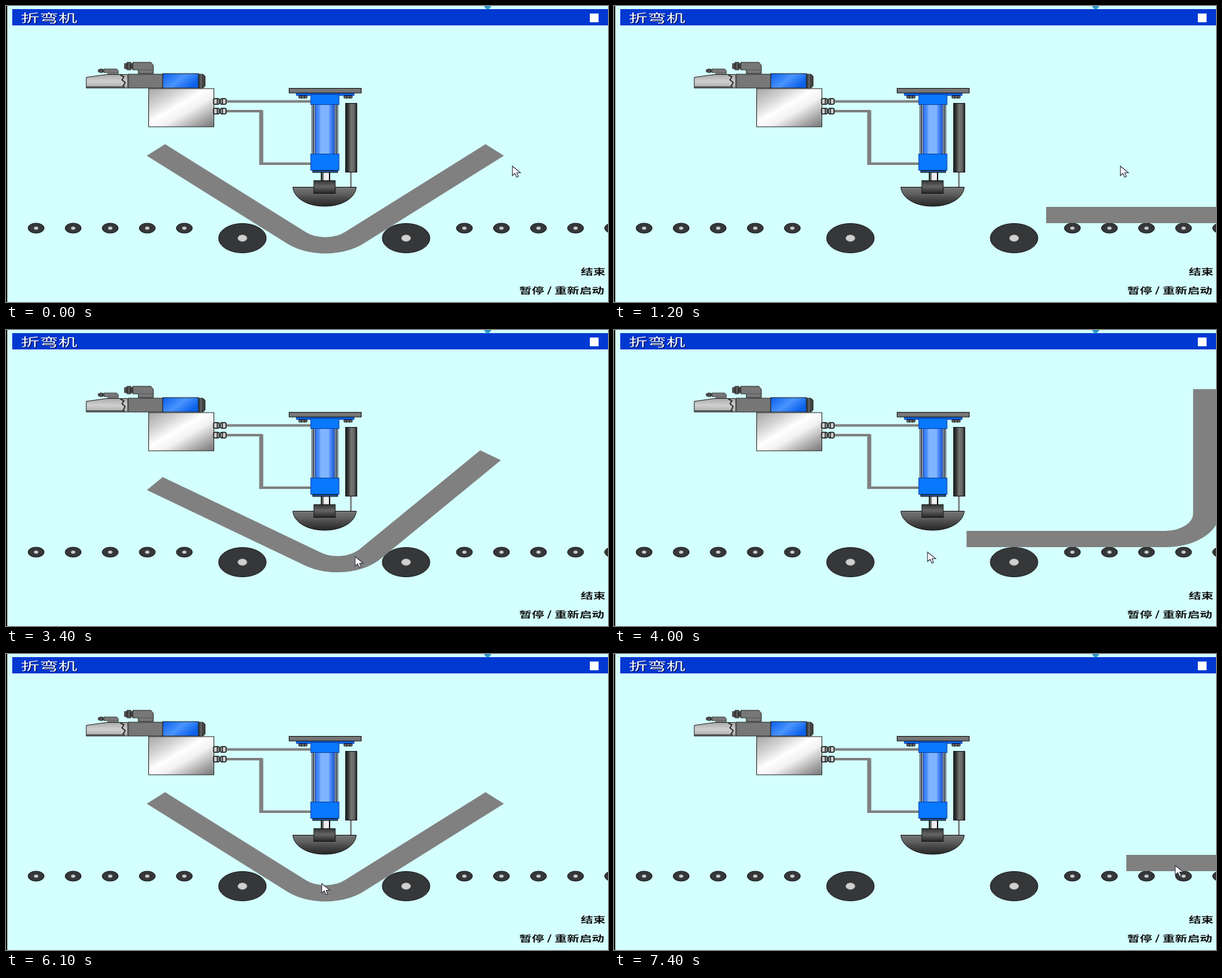
An HTML page that plays this animation: 960 px wide and 473 px high, repeating every 7.5 s.

```html
<!DOCTYPE html>
<html lang="zh">
<head>
<meta charset="utf-8">
<title>折弯机</title>
<style>
  html, body { margin: 0; width: 100%; height: 100%; overflow: hidden; background: #d4ffff; }
  svg { display: block; width: 960px; height: 473px; }
  text { font-family: "Noto Sans CJK SC", "Noto Sans CJK", sans-serif; font-weight: 700; }
  .title { font-size: 30px; font-weight: 500; }
</style>
</head>
<body>
<svg viewBox="0 0 960 473">
  <defs>
    <linearGradient id="steel" x1="0" y1="0" x2="1" y2="1">
      <stop offset="0" stop-color="#a5a5a5"/><stop offset=".25" stop-color="#d2d2d2"/>
      <stop offset=".45" stop-color="#fff"/><stop offset=".6" stop-color="#f2f2f2"/>
      <stop offset=".85" stop-color="#a0a0a0"/><stop offset="1" stop-color="#777"/>
    </linearGradient>
    <linearGradient id="sensor">
      <stop offset="0" stop-color="#222"/><stop offset=".22" stop-color="#333"/>
      <stop offset=".5" stop-color="#777"/><stop offset=".75" stop-color="#666"/><stop offset="1" stop-color="#222"/>
    </linearGradient>
    <linearGradient id="barrel">
      <stop offset="0" stop-color="#2f6fe8"/><stop offset=".2" stop-color="#4c92ff"/>
      <stop offset=".3" stop-color="#80b4ff"/><stop offset=".68" stop-color="#80b4ff"/>
      <stop offset=".8" stop-color="#4588fa"/><stop offset="1" stop-color="#2459c8"/>
    </linearGradient>
    <linearGradient id="coil" x2="1" y2=".5">
      <stop offset="0" stop-color="#0a60e8"/><stop offset=".55" stop-color="#4a94ff"/><stop offset="1" stop-color="#0c62ea"/>
    </linearGradient>
    <linearGradient id="dish" x2="0" y2="1">
      <stop offset="0" stop-color="#777"/><stop offset=".4" stop-color="#5c5c5c"/>
      <stop offset=".55" stop-color="#4b4b4b"/><stop offset="1" stop-color="#262626"/>
    </linearGradient>
    <linearGradient id="clamp" x2="0" y2="1">
      <stop offset="0" stop-color="#333"/><stop offset=".45" stop-color="#666"/><stop offset="1" stop-color="#252525"/>
    </linearGradient>
    <linearGradient id="nose" x2="0" y2="1">
      <stop offset="0" stop-color="#aaa"/><stop offset=".5" stop-color="#d0d0d0"/><stop offset="1" stop-color="#aaa"/>
    </linearGradient>
    <g id="nut" stroke="#111" stroke-width="1.500" fill="#ccc">
      <rect x="0" y="-4.500" width="9" height="9" rx="2"/>
      <rect x="11" y="-4.500" width="9" height="9" rx="2"/>
      <path d="M6-4V4M14-4V4"/>
    </g>
    <g id="plug" stroke="#222" fill="#777">
      <path d="M13 1H42L46 6V19H22V13H13Z"/>
      <path d="M0 3H4V11H0ZM4 1H10V13H4ZM10 3H13V11H10Z" fill="#555"/>
      <path d="M23 13H46" stroke="#555"/>
    </g>
  </defs>

  <rect width="960" height="473" fill="#d4ffff"/>
  <rect x="10" y="5" width="950" height="26" fill="#0038d2"/>
  <path d="M762 0H774L771 4L768 6L765 4Z" fill="#2a98c8"/>
  <rect x="931" y="12" width="14" height="14" fill="#fff"/>
  <g transform="scale(1 .62)">
    <text class="title" x="25" y="43.500" fill="#001560">折弯机</text>
    <text class="title" x="23.500" y="42" fill="#fff">折弯机</text>
  </g>
  <g transform="scale(1 .66)" font-size="19.800" text-anchor="end" fill="#111">
    <text x="956" y="650">结束</text>
    <text x="954" y="695">暂停 / 重新启动</text>
  </g>

  <g id="rollers"></g>
  <path id="plate" fill="none" stroke="#808080" stroke-width="41.500"/>

  <g fill="none" stroke="#808080">
    <path d="M350 152.500H487" stroke-width="4"/>
    <path d="M350 168H409M405 252H487" stroke-width="4"/>
    <path d="M407 167V254" stroke-width="6.500"/>
  </g>

  <g stroke="#222">
    <use href="#plug" transform="translate(189 89)"/>
    <use href="#plug" transform="translate(147 100) scale(.7 .5)"/>
    <path d="M128 114L160 109.500H194V131H128Z" fill="url(#nose)"/>
    <path d="M128 129.500H190" stroke="#444" stroke-width="2"/>
    <path d="M182 110L188 113L185 118L190 122L186 130" fill="none" stroke="#333" stroke-width="2"/>
    <rect x="195" y="109" width="55" height="22" fill="#777"/>
    <rect x="250" y="108" width="57" height="23" fill="url(#coil)"/>
    <path d="M307 109H314L317.500 112V128L314 131H307Z" fill="#444"/>
    <path d="M311 109V131" stroke="#888"/>
    <rect x="227.500" y="132" width="104" height="61" fill="url(#steel)"/>
  </g>
  <use href="#nut" x="331" y="152.500"/>
  <use href="#nut" x="331" y="168"/>

  <g id="ram" stroke="#111">
    <path d="M550 205V290" stroke="#777" stroke-width="2.500"/>
    <rect x="503" y="205" width="13" height="80" fill="#eee" stroke-width="2"/>
    <path d="M505 205V280" stroke="#666" stroke-width="3"/>
    <path d="M457.500 289.500H558.500C557 307 536 320 508 320S459 307 457.500 289.500Z" fill="url(#dish)"/>
    <rect x="491" y="279" width="34" height="20.500" fill="url(#clamp)"/>
  </g>

  <g stroke="#111">
    <rect x="541.500" y="155.500" width="18" height="110" fill="url(#sensor)"/>
    <rect x="488" y="157" width="41" height="80" fill="#c8dcf0"/>
    <path d="M490.500 157V237M526.500 157V237" stroke-width="1.500"/>
    <rect x="493" y="157" width="31" height="80" fill="url(#barrel)" stroke="#123a90"/>
    <path d="M463 139H555V143H463Z" fill="#0a62ea" stroke="#0b3f9c"/>
    <rect x="486" y="141.500" width="45" height="16" fill="#0878ff" stroke="#0b3f9c"/>
    <rect x="486" y="236.500" width="45" height="26" fill="#0878ff" stroke="#0b3f9c"/>
    <path d="M489 263H529V266H489Z" fill="#235ba8"/>
    <rect x="451.500" y="131.500" width="115" height="7.500" fill="#777"/>
    <path d="M467 143.500H480V147H467ZM539 143.500H552V147H539Z" fill="#777"/>
    <path d="M471 143V148M476 143V148M543 143V148M548 143V148"/>
  </g>

  <g id="tools" fill="#c4f1f4" stroke="#92ced8" stroke-width="1.200">
    <path d="M18 458L27 452V456H39V460H27V464Z"/>
    <path d="M63 464L66 460L78 451L81 453L69 462Z"/>
    <path d="M104 453H125V463H104ZM104 455H125"/>
    <path d="M168 458L159 452V456H146V460H159V464Z"/>
  </g>
  <rect width="2" height="473" fill="#000"/>
  <path id="cursor" d="M0 0V15L4 11.500L7 17.500L9.500 16.500L7 10.500H13Z" fill="#fff" stroke="#334" stroke-width="1.100"/>
</svg>
<script>
const $ = id => document.getElementById(id);
const LOOP = 7500, CYCLE = 2933, LEAD = 1283, HOLD = 7200;
const SPEED = 0.954, SQUEEZE = 0.627, RADIUS = 65, HALF_THICK = 20.75, FLOOR = 347;

const roller = (x, y, rx, ry, dot) =>
  `<ellipse cx="${x}" cy="${y}" rx="${rx}" ry="${ry}" fill="#353739" stroke="#17191a"/>` +
  `<ellipse cx="${x}" cy="${y}" rx="${dot}" ry="${dot * .72}" fill="#d0d0d0" stroke="#777" stroke-width=".6"/>`;
let html = roller(377, 371, 38, 23.5, 7.5) + roller(638, 371, 38, 23.5, 7.5);
for (let i = 0; i < 5; i++)
  for (const start of [48, 731]) html += roller(start + 59.1 * i, 355, 12.8, 8, 3.5);
$('rollers').innerHTML = html;

// time, x, y
const cursorPath = [
  [0, 807.5, 256], [1300, 807.5, 256], [1600, 720, 310], [2300, 571, 364], [3300, 571, 364],
  [3800, 500, 355], [4900, 500, 355], [5250, 854, 361], [5500, 854, 361], [5900, 503.5, 367],
  [6500, 503.5, 367], [7200, 895, 340], [7300, 895, 340], [7400, 895, 338], [7500, 895, 338]
];

const ramp = (t, from, to) => Math.min(1, Math.max(0, (t - from) / (to - from)));
const mix = (a, b, k) => a + (b - a) * k;

// Centre line relative to the centre of the bend
function plateShape(bend) {
  const angle = bend * Math.PI / 4, leg = mix(363, 317, bend);
  const sx = RADIUS * Math.sin(angle), sy = RADIUS * Math.cos(angle);
  const ex = sx + leg * Math.cos(angle), ey = sy - leg * Math.sin(angle);
  return `M${-ex} ${ey}L${-sx} ${sy}A${RADIUS} ${RADIUS} 0 0 0 ${sx} ${sy}L${ex} ${ey}`;
}

function drawPress(phase) {
  const bend = ramp(phase, 950, 1056);
  const turn = ramp(phase, 1716, 1916);
  const press = bend - ramp(phase, 1056, 1230);
  let x = Math.min(853, phase * SPEED) - 363;
  x = mix(x, 509.2, bend);
  const left = Math.max(306, 815 + (phase - 2616) * SPEED);
  x = mix(x, left + 318, turn);
  const bottom = FLOOR + 48.5 * (bend - turn);
  const y = bottom - (RADIUS + HALF_THICK) * SQUEEZE;
  $('plate').setAttribute('d', plateShape(bend));
  $('plate').setAttribute('transform', `translate(${x} ${y}) scale(1 ${SQUEEZE}) rotate(${-45 * turn})`);
  $('ram').setAttribute('transform', `translate(0 ${49 * press})`);
}

function drawCursor(t) {
  const i = cursorPath.findIndex(p => p[0] > t);
  const [t0, x0, y0] = cursorPath[i - 1], [t1, x1, y1] = cursorPath[i];
  const k = ramp(t, t0, t1);
  $('cursor').setAttribute('transform', `translate(${mix(x0, x1, k)} ${mix(y0, y1, k)})`);
}

function frame(now) {
  const t = Math.floor(now % LOOP / 100) * 100;
  drawPress((Math.min(t, HOLD) + LEAD) % CYCLE);
  drawCursor(t);
  const tools = (t >= 2000 && t < 2900) || (t >= 5000 && t < 5600);
  $('tools').style.display = tools ? '' : 'none';
  requestAnimationFrame(frame);
}
frame(performance.now());
</script>
</body>
</html>
```
